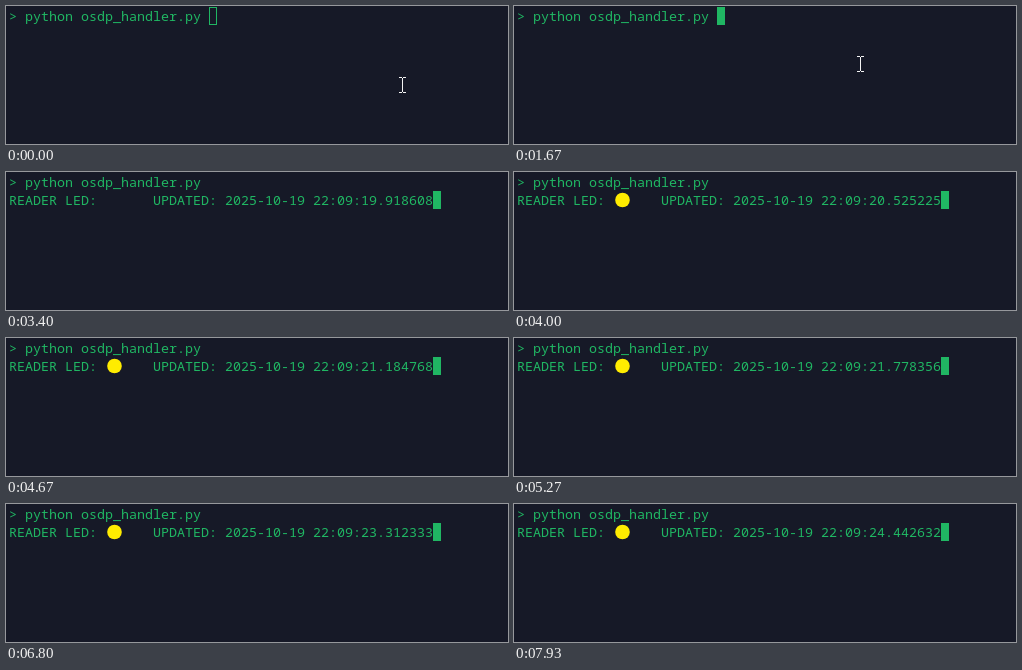
Write an HTML page with a canvas that moves like this. It is 502 px wide and 138 px high and loops after 8 s.

```html
<!DOCTYPE html>
<html lang="en">
<head>
<meta charset="utf-8">
<title>Terminal: reader LED</title>
<style>
  html, body { margin: 0; width: 100%; height: 100%; overflow: hidden; background: #161927; }
  canvas { display: block; width: 502px; height: 138px; }
</style>
</head>
<body>
<canvas id="stage" width="502" height="138"></canvas>
<script>
const ctx = document.getElementById('stage').getContext('2d');

const BG = '#161927', GREEN = '#20b663', YELLOW = '#ffec00', POINTER = '#f4f4f4';
const LOOP = 8000, STEP = 1000 / 15, LAST_STEP = 119;
const LEFT = 3, TOP = 1, CELL_W = 8, CELL_H = 18, ASCENT = 14;

// Steps of the key moments
const FOCUS = 25, ENTER = 31, OUTPUT = 33, LED_ON = 58;

// Wall clock readings: [step, seconds past 22:09]
const CLOCK = [[42, 19.311990], [60, 20.525225], [79, 21.778356], [102, 23.312333], [119, 24.442632]];

const POINTER_FROM = [393, 71], POINTER_TO = [343, 50];
const POINTER_EASE = [0, 0.4, 0.8, 1];

const cellX = col => LEFT + col * CELL_W;
const cellY = row => TOP + row * CELL_H;

function write(text, col, row) {
  ctx.fillStyle = GREEN;
  ctx.fillText(text, cellX(col), cellY(row) + ASCENT);
}

function caret(col, row, filled) {
  const x = cellX(col), y = cellY(row);
  if (filled) {
    ctx.fillStyle = GREEN;
    ctx.fillRect(x, y, CELL_W, CELL_H);
  } else {
    ctx.strokeStyle = GREEN;
    ctx.lineWidth = 1;
    ctx.strokeRect(x + 0.5, y + 0.5, CELL_W - 1, CELL_H - 1);
  }
}

function pointer(step) {
  const p = POINTER_EASE[Math.min(step, 3)];
  const [x, y] = POINTER_FROM.map((from, i) => Math.round(from + (POINTER_TO[i] - from) * p));
  ctx.fillStyle = POINTER;
  for (const [dx, dy, w, h] of [[0, 0, 3, 1], [4, 0, 3, 1], [3, 1, 1, 14], [0, 15, 3, 1], [4, 15, 3, 1]]) {
    ctx.fillRect(x + dx, y + dy, w, h);
  }
}

function clockText(step) {
  let i = 0;
  while (i < CLOCK.length - 2 && step > CLOCK[i + 1][0]) i++;
  const [s0, t0] = CLOCK[i], [s1, t1] = CLOCK[i + 1];
  const seconds = t0 + (t1 - t0) * (step - s0) / (s1 - s0);
  return '2025-10-19 22:09:' + seconds.toFixed(6);
}

function led() {
  ctx.fillStyle = YELLOW;
  ctx.beginPath();
  ctx.arc(108.5, 28, 7.3, 0, Math.PI * 2);
  ctx.fill();
}

function draw(step) {
  ctx.fillStyle = BG;
  ctx.fillRect(0, 0, 502, 138);
  ctx.font = '13.3333px "Noto Sans Mono", monospace';
  write('> python osdp_handler.py', 0, 0);

  if (step < ENTER) {
    caret(25, 0, step >= FOCUS);
    pointer(step);
  } else if (step < OUTPUT) {
    caret(0, 1, true);
  } else {
    write('READER LED:', 0, 1);
    write('UPDATED: ' + clockText(step), 18, 1);
    if (step >= LED_ON) led();
    caret(53, 1, true);
  }
}

const start = performance.now();
function tick() {
  const t = (performance.now() - start) % LOOP;
  // The small lead absorbs rounding of step times to 10 ms
  draw(Math.min(LAST_STEP, Math.floor((t + 4) / STEP)));
  requestAnimationFrame(tick);
}
tick();
</script>
</body>
</html>
```
